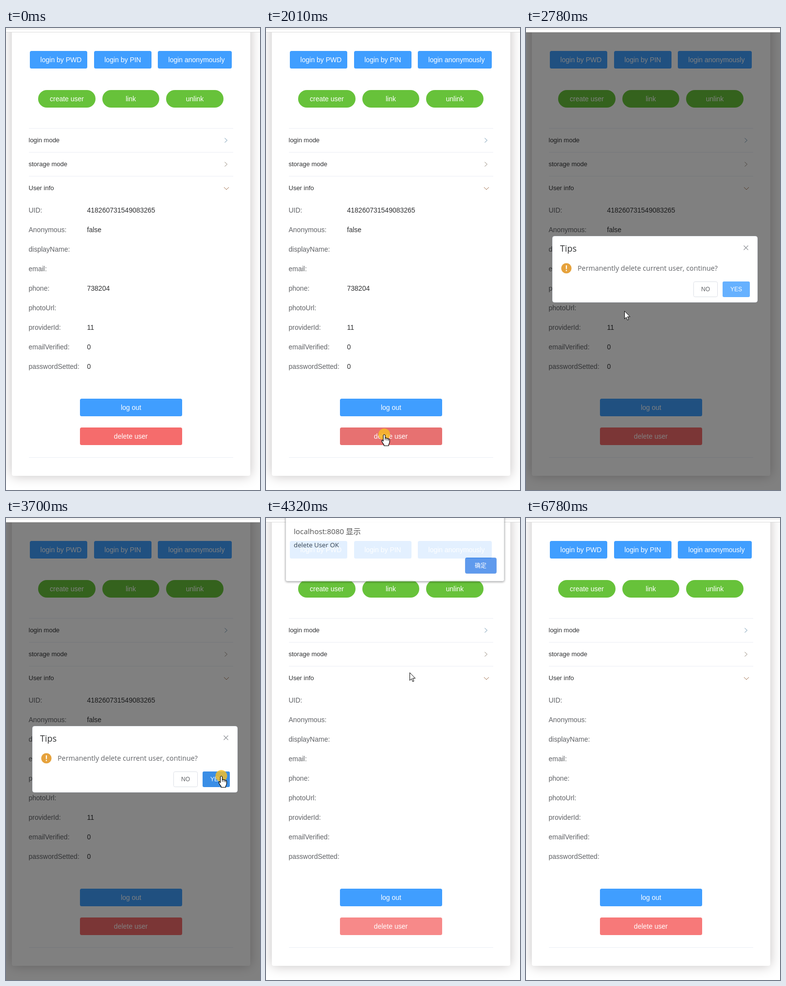
Recreate the animation shown at these times as an HTML page. Size 522 px wide and 946 px high, loop 6.87 s.

```html
<!DOCTYPE html>
<html lang="en">
<head>
<meta charset="utf-8">
<style>
html, body { margin: 0; width: 100%; height: 100%; overflow: hidden; background: #fff; }
svg { display: block; width: 522px; height: 946px; font: 14px "Liberation Sans", Arial, sans-serif; }
.ui { font-family: "Open Sans", "Noto Sans", "Noto Sans CJK SC", sans-serif; }
.card { filter: drop-shadow(0 0 12px #c4c0c0); }
.alert { filter: drop-shadow(0 1px 2px rgba(0, 0, 0, .45)); }
</style>
</head>
<body>
<svg id="stage" viewBox="0 0 522 946"></svg>
<script>
const LOOP = 6870, TICK = 77.2;
const BLUE = '#409eff', GREEN = '#67c23a', RED = '#f56c6c', RED_LIGHT = '#f78989', BLUE_LIGHT = '#66b1ff';

const rect = (x, y, w, h, fill, r = 0, more = '') =>
  `<rect x="${x}" y="${y}" width="${w}" height="${h}" fill="${fill}" rx="${r}" ${more}/>`;
const text = (x, y, s, fill, size = 14, more = '') =>
  `<text x="${x}" y="${y}" fill="${fill}" font-size="${size}" ${more}>${s}</text>`;
const line = (d, stroke, w = 1) => `<path d="${d}" fill="none" stroke="${stroke}" stroke-width="${w}"/>`;
const mid = 'text-anchor="middle"';
const button = (x, y, w, s, fill, r = 3.5, tx = x + w / 2, id = '') =>
  rect(x, y, w, 36, fill, r, id && `id="${id}"`) + text(tx, y + 23, s, '#fff', 14, mid);

const rows = [['UID', '418260731549083265'], ['Anonymous', 'false'], ['displayName', ''], ['email', ''],
  ['phone', '738204'], ['photoUrl', ''], ['providerId', '11'], ['emailVerified', '0'], ['passwordSetted', '0']];
const rowY = i => 378 + 40 * i;

const page =
  `<clipPath id="view"><rect y="9" width="522" height="937"/></clipPath>` +
  rect(0, 0, 522, 946, '#fff') +
  `<g clip-path="url(#view)">${rect(12, -60, 490, 977, '#fff', 4, 'class="card"')}</g>` +
  rect(0, 0, 522, 9, '#fff') + rect(0, 0, 522, 4, '#f2f2f2') + rect(0, 8, 522, 1, '#dadada') +
  button(49, 47, 118, 'login by PWD', BLUE, 3.5, 113) +
  button(181, 47, 118, 'login by PIN', BLUE, 3.5, 240) +
  button(312, 47, 152, 'login anonymously', BLUE, 3.5, 391.5) +
  button(66, 127, 118, 'create user', GREEN, 18) +
  button(198, 127, 117, 'link', GREEN, 18) +
  button(329, 127, 118, 'unlink', GREEN, 18) +
  [205, 254, 303, 879].map(y => rect(47, y, 420, 1, '#ebeef5')).join('') +
  ['login mode', 'storage mode', 'User info'].map((s, i) => text(46.5, 234 + 49 * i, s, '#303133', 13)).join('') +
  line('M449.5,225.5L454.5,230L449.5,234.5', '#6c94ad') +
  line('M449.5,274.5L454.5,279L449.5,283.5', '#93877a') +
  line('M448,326L453,331L458,326', '#a0714f') +
  rows.map(([label], i) => text(46.5, rowY(i), label + ':', '#606266')).join('') +
  `<g id="values">${rows.map(([, v], i) => text(166.5, rowY(i), v, '#303133')).join('')}</g>` +
  button(152, 759, 210, 'log out', BLUE) +
  button(152, 818, 210, 'delete user', RED, 3.5, 256.5, 'remove');

const dialog = `<g id="dialog">` +
  rect(54.5, 426.5, 421, 135, '#fff', 4, 'stroke="#ebeef5"') +
  text(70, 458, 'Tips', '#303133', 18, 'class="ui"') +
  line('M447.5,445.5L456.5,454.5M456.5,445.5L447.5,454.5', '#909399', 1.2) +
  `<circle cx="83" cy="492" r="10.6" fill="#e6a23c"/>` +
  line('M83,486V493.5M83,495.5V497.7', '#fff', 2.2) +
  text(106, 497, 'Permanently delete current user, continue?', '#606266', 14.3, 'class="ui"') +
  rect(344.5, 519.5, 49, 31, '#fff', 3, 'stroke="#dcdfe6"') + text(369, 539, 'NO', '#606266', 12, mid) +
  rect(404, 519, 56, 32, BLUE_LIGHT, 3, 'id="yes"') + text(432, 539, 'YES', '#fff', 12, mid) + `</g>`;

const notice = `<g id="notice"><g class="alert">${rect(40.5, -10, 449, 139.5, '#fff', 3, 'stroke="#c4c6c9"')}</g>` +
  text(57, 33, 'localhost:8080 显示', '#333', 15.3, 'class="ui"') +
  text(57, 60, 'delete User OK', '#333', 13.3, 'class="ui"') +
  rect(409.5, 81.5, 64, 32, '#4589ea', 3, 'stroke="#5f97e6"') +
  text(441, 102, '确定', '#fff', 12, mid + ' class="ui"') + `</g>`;

const pointer = `<g id="cursor" stroke="#000" stroke-linejoin="round">` +
  `<circle id="ring" r="12" fill="#f7be25" opacity=".82" stroke="none"/>` +
  `<path id="arrow" fill="#fff" d="M.5,.5V16.5L4,13L6.5,18.8L9,17.8L6.5,12H11.8Z"/>` +
  `<g id="hand" stroke-width="1.2"><path fill="#fff" d="M-2,2Q0,-1 2,2V8Q4,6.5 5.5,8.5Q7.5,7.5 8.5,9.5Q11,9 11,11.5V16Q10.5,19 9,21V23.5H-.5V21.5Q-3,18.5 -5,14.5Q-5.5,11 -3.5,12L-2,14Z"/>` +
  line('M2,8V12M5.5,9V12.5M8.5,10V13', '#000') + `</g></g>`;

stage.innerHTML = page + rect(0, 9, 522, 937, '#000', 0, 'id="mask"') + dialog + notice + pointer;
const $ = id => document.getElementById(id);

const clamp = x => Math.min(1, Math.max(0, x));
// the CSS "ease" curve, cubic-bezier(.25, .1, .25, 1)
function ease(x) {
  x = clamp(x);
  let lo = 0, hi = 1;
  const at = (u, a, b) => 3 * (1 - u) ** 2 * u * a + 3 * (1 - u) * u * u * b + u ** 3;
  for (let i = 0; i < 20; i++) {
    const u = (lo + hi) / 2;
    if (at(u, .25, .25) < x) lo = u; else hi = u;
  }
  return at(hi, .1, 1);
}
const curves = {
  in: k => k * k,
  out: k => 1 - (1 - k) ** 2,
  flat: k => k,
  both: k => k * k * (3 - 2 * k)
};

// time, x, y, and the curve used to arrive there
const path = [
  [150, 433, 960], [535, 371, 537, 'out'], [690, 371, 537], [915, 345, 498], [1070, 345, 498],
  [1770, 243, 832], [2230, 243, 832], [2620, 217, 668, 'in'], [2700, 200, 612, 'flat'], [2775, 202, 579, 'flat'],
  [3310, 451, 526, 'out'], [3470, 442.5, 528], [3940, 442.5, 528], [4395, 283, 299], [4555, 283, 299],
  [5010, 438, 96], [5480, 438, 96], [5940, 432, 836, 'in'], [6095, 460, 935, 'flat'], [6160, 462, 970, 'flat']
];
function place(t) {
  const n = path.findIndex(p => p[0] > t);
  if (n < 1) return [462, 990];
  const [t0, x0, y0] = path[n - 1], [t1, x1, y1, curve = 'both'] = path[n];
  const k = curves[curve]((t - t0) / (t1 - t0));
  return [x0 + (x1 - x0) * k, y0 + (y1 - y0) * k];
}

const within = (t, ...spans) => spans.some(([a, b]) => t >= a && t < b);
const show = (id, on) => $(id).setAttribute('visibility', on ? 'visible' : 'hidden');
const fade = (id, a) => { $(id).setAttribute('opacity', a); show(id, a > 0); };
const OPEN = 2042, CLOSE = 3884, DONE = 4235;

function removeColor(t) {
  if (t >= 6775) return '#f77979';
  if (t >= CLOSE) return RED_LIGHT;
  if (within(t, [1985, OPEN])) return '#e77171';
  return within(t, [1670, 1985]) ? RED_LIGHT : RED;
}

function draw(now) {
  const t = 227 + Math.floor((now % LOOP - 213) / TICK) * TICK;
  fade('mask', .5 * (ease((t - OPEN) / 200) - ease((t - CLOSE) / 200)));
  const open = ease((t - OPEN) / 300) - ease((t - CLOSE) / 300);
  fade('dialog', open);
  $('dialog').setAttribute('transform', `translate(0 ${-20 * (1 - open)})`);
  fade('notice', ease((t - DONE) / 150) - ease((t - 5470) / 130));
  show('values', t < DONE);
  $('remove').setAttribute('fill', removeColor(t));
  $('yes').setAttribute('fill', within(t, [3690, 3850]) ? '#3a8ee6' : BLUE_LIGHT);

  const hand = within(t, [1830, 2130], [3300, 4000]);
  show('hand', hand);
  show('arrow', !hand);
  show('ring', within(t, [1985, 2110], [3690, 3850], [5310, 5440]));
  $('cursor').setAttribute('transform', `translate(${place(t)})`);
  requestAnimationFrame(() => draw(performance.now()));
}
draw(0);
</script>
</body>
</html>
```
